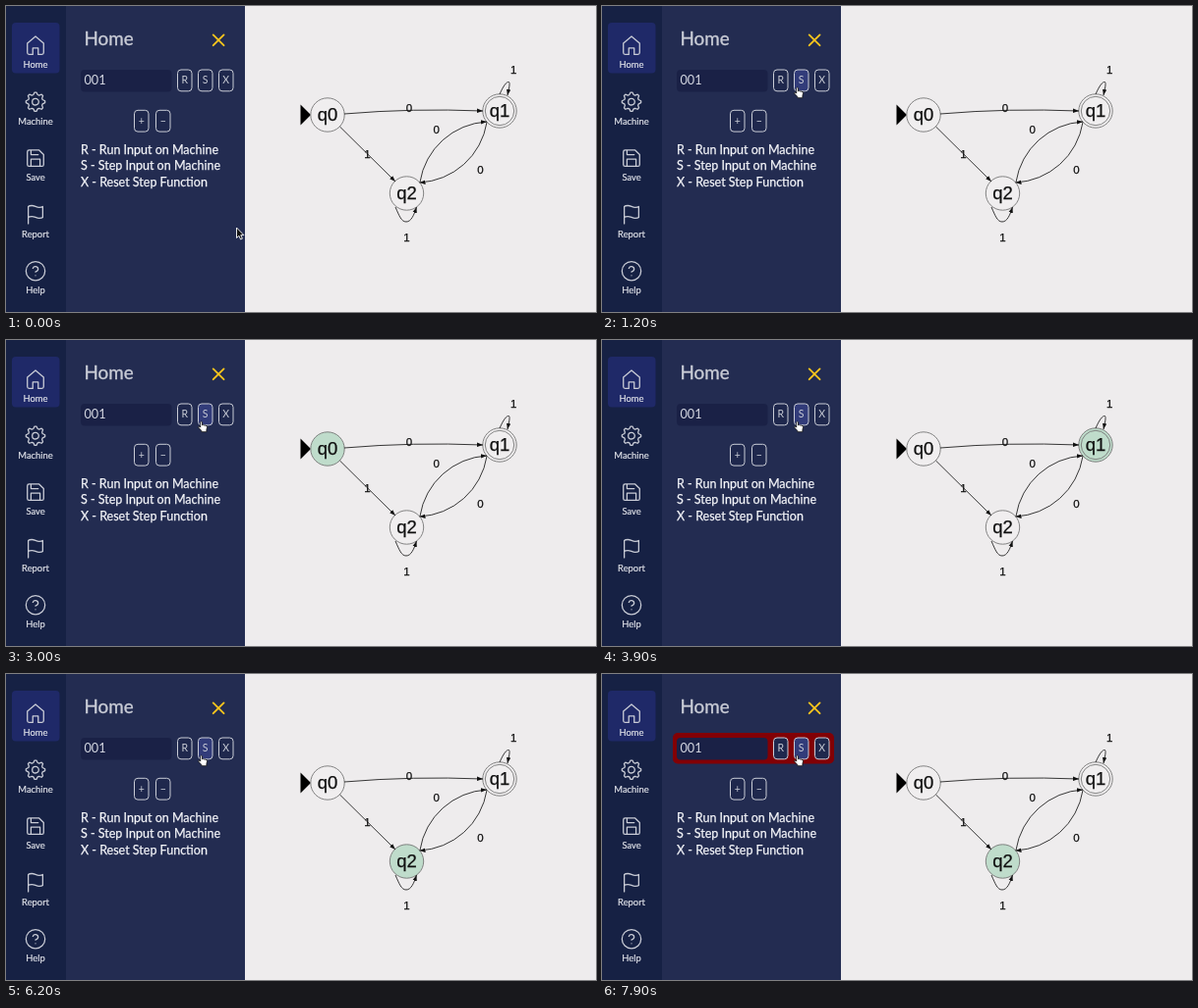
An HTML page for the animation above (8000 ms loop, 600 px wide and 312 px high).

```html
<!DOCTYPE html>
<html lang="en">
<head>
<meta charset="utf-8">
<title>Automaton stepper</title>
<style>
  html, body { margin: 0; width: 100%; height: 100%; overflow: hidden; background: #eeeced; }
  svg { display: block; width: 600px; height: 312px; }
  text { font-family: Lato, "Open Sans", sans-serif; fill: #f4f5f9; }
  .mid { text-anchor: middle; }
  .menu text { font-size: 9.4px; fill: #dfe1e8; stroke: #dfe1e8; stroke-width: .2; }
  .icon { fill: none; stroke: #c9ccd6; stroke-width: 1.4; stroke-linecap: round; stroke-linejoin: round; }
  .help { font-size: 12.5px; stroke: #f4f5f9; stroke-width: .25; }
  .button rect { fill: #1f284d; stroke: #c9ccd6; }
  .button text { font-size: 10.5px; fill: #c9ccd6; }
  .button.hover rect { fill: #323c7a; }
  .graph text { font-family: "Liberation Sans", Arial, sans-serif; fill: #111; stroke: #111; stroke-width: .25; text-anchor: middle; }
  .state { fill: #f0eeef; stroke: #777; stroke-width: .9; }
  .state.on { fill: #bfdccb; }
  .edge { fill: none; stroke: #222; stroke-width: .9; }
</style>
</head>
<body>
<svg viewBox="0 0 600 312">
  <defs>
    <marker id="tip" markerUnits="userSpaceOnUse" markerWidth="7" markerHeight="6" refX="6" refY="2.5" orient="auto">
      <path d="M0 .3L6 2.5L0 4.7z" fill="#111"/>
    </marker>
  </defs>

  <rect width="243" height="312" fill="#232c51"/>
  <rect width="61" height="312" fill="#162144"/>
  <rect x="6" y="17" width="48.5" height="51.5" rx="4" fill="#1f2968"/>
  <g class="menu mid" id="menu"></g>

  <text x="79.5" y="40" font-size="18.8" style="fill:#c9ccd6;stroke:#c9ccd6;stroke-width:.35">Home</text>
  <path d="M210.7 29.4l10.8 10.8m0-10.8l-10.8 10.8" stroke="#f6c51d" stroke-width="1.9" stroke-linecap="round"/>
  <rect id="alert" x="72" y="60" width="164" height="31.5" rx="5" fill="#820005"/>
  <rect x="76" y="65" width="92.5" height="22.5" rx="4" fill="#1a2146"/>
  <text x="79.5" y="80.2" font-size="12.7" style="fill:#d5d8e2">001</text>
  <g id="buttons"></g>
  <g class="help">
    <text x="76" y="150.5">R - Run Input on Machine</text>
    <text x="76" y="167.3">S - Step Input on Machine</text>
    <text x="76" y="184">X - Reset Step Function</text>
  </g>

  <g class="graph">
    <path d="M299.5 100.5L310 111L299.5 121.5z"/>
    <g id="states"></g>
    <g id="edges"></g>
  </g>

  <g id="cursor">
    <circle id="click" r="13" fill="#0c1230" fill-opacity=".35" stroke="#0c1230"/>
    <path id="arrow" d="M0 0V10.5L2.4 8.3L4.1 12L5.9 11.2L4.3 7.6H7.4z" fill="#111" stroke="#fff" stroke-width=".9"/>
    <path id="hand" transform="translate(.3 -.8)" d="M-.9 1Q0-.3 .9 1V4.2Q2 3.4 2.7 4.4Q3.8 3.7 4.4 4.8Q6 4.3 6 6L5.3 9V11H.2V9.8L-3 6.4Q-3.1 5 -1.8 5.5L-.9 6.4z" fill="#fff" stroke="#111" stroke-width=".8"/>
  </g>
</svg>
<script>
const $ = id => document.getElementById(id);

// Cog outline: eight teeth, four corners each.
const cog = 'M' + Array.from({ length: 32 }, (_, i) => {
  const a = (i - .5) * Math.PI / 16, r = i % 4 < 2 ? 10.6 : 8.2;
  return `${(12 + r * Math.cos(a)).toFixed(1)} ${(12 + r * Math.sin(a)).toFixed(1)}`;
}).join('L') + 'z';
const ring = r => `M${12 - r} 12a${r} ${r} 0 1 0 ${2 * r} 0a${r} ${r} 0 1 0 ${-2 * r} 0`;

const menu = [
  ['Home', 'M3 9.5l9-7.5 9 7.5v10.5a2 2 0 0 1-2 2H15v-7H9v7H5a2 2 0 0 1-2-2z'],
  ['Machine', cog + ring(3.6)],
  ['Save', 'M19 21H5a2 2 0 0 1-2-2V5a2 2 0 0 1 2-2h11l5 5v11a2 2 0 0 1-2 2zM17 21v-8H7v8M7 3v5h8'],
  ['Report', 'M4 15s1-1 4-1 5 2 8 2 4-1 4-1V3s-1 1-4 1-5-2-8-2-4 1-4 1zM4 22v-7'],
  ['Help', ring(10.5) + 'M9.1 9a3 3 0 0 1 5.8 1c0 2-3 3-3 3M12 17h.01']
];
$('menu').innerHTML = menu.map(([label, d], i) => {
  const y = 40.2 + i * 57.5;
  return `<path class="icon" transform="translate(30 ${y}) scale(.92) translate(-12 -12)" d="${d}"/>
    <text x="30" y="${y + 23.2}">${label}</text>`;
}).join('');

const buttons = [['R', 174.5, 65], ['S', 195.5, 65], ['X', 216.5, 65], ['+', 130.5, 106.3], ['−', 152.5, 106.3]];
$('buttons').innerHTML = buttons.map(([label, x, y]) =>
  `<g class="button mid" id="b${label}"><rect x="${x}" y="${y}" width="14.5" height="21.8" rx="3.5"/>
   <text x="${x + 7.2}" y="${y + 14.4}">${label}</text></g>`).join('');

const states = [[327, 111], [502, 107], [407.5, 191]];
$('states').innerHTML = states.map(([x, y], i) =>
  `<circle class="state" id="q${i}" cx="${x}" cy="${y}" r="17.2"/>` +
  (i === 1 ? `<circle cx="${x}" cy="${y}" r="14.7" fill="none" stroke="#777" stroke-width=".9"/>` : '') +
  `<text x="${x}" y="${y + 6}" font-size="18.5">q${i}</text>`).join('');

const edges = [
  ['M344 110Q414 104 485 107', 0, 410, 107.5],
  ['M339.5 123L396 179', 1, 367.5, 154.7],
  ['M421 179.5A73 73 0 0 1 489 118', 0, 437.8, 130],
  ['M489 118.5A73 73 0 0 1 420.5 180', 0, 482.5, 170.5],
  ['M502 90C506 81 509 77 511.5 77.5C513 79 511 86 510 91', 1, 516.3, 68.5],
  ['M396 205C400 214 402 220 407 220C412 220 415 213 417.5 205', 1, 407.5, 239.8]
];
$('edges').innerHTML = edges.map(([d, label, x, y]) =>
  `<path class="edge" d="${d}" marker-end="url(#tip)"/><text x="${x}" y="${y}" font-size="11.5">${label}</text>`).join('');

// Three steps light one state each; the fourth rejects the input.
const clicks = [2200, 3600, 5000, 6300];
const order = [0, 1, 2, 2];
const show = (id, on) => $(id).style.display = on ? '' : 'none';

function draw(now) {
  const t = Math.floor(now % 8000 / 100) * 100;
  const p = Math.min(1, Math.max(0, (t - 300) / 800)), e = p * p * (3 - 2 * p);
  const x = 234.5 - 36.2 * e, y = 226 - 142.5 * e;
  const hover = y < 88;
  const done = clicks.filter(c => t >= c).length;
  const age = done ? t - clicks[done - 1] : Infinity;

  $('cursor').setAttribute('transform', `translate(${x} ${y})`);
  show('arrow', !hover);
  show('hand', hover);
  $('click').setAttribute('opacity', Math.max(0, .8 - age / 300));
  show('alert', done === clicks.length);
  $('bS').classList.toggle('hover', hover);
  states.forEach((_, i) => $('q' + i).classList.toggle('on', i === order[done - 1]));
  requestAnimationFrame(() => draw(performance.now() - start));
}
const start = performance.now();
draw(0);
</script>
</body>
</html>
```
